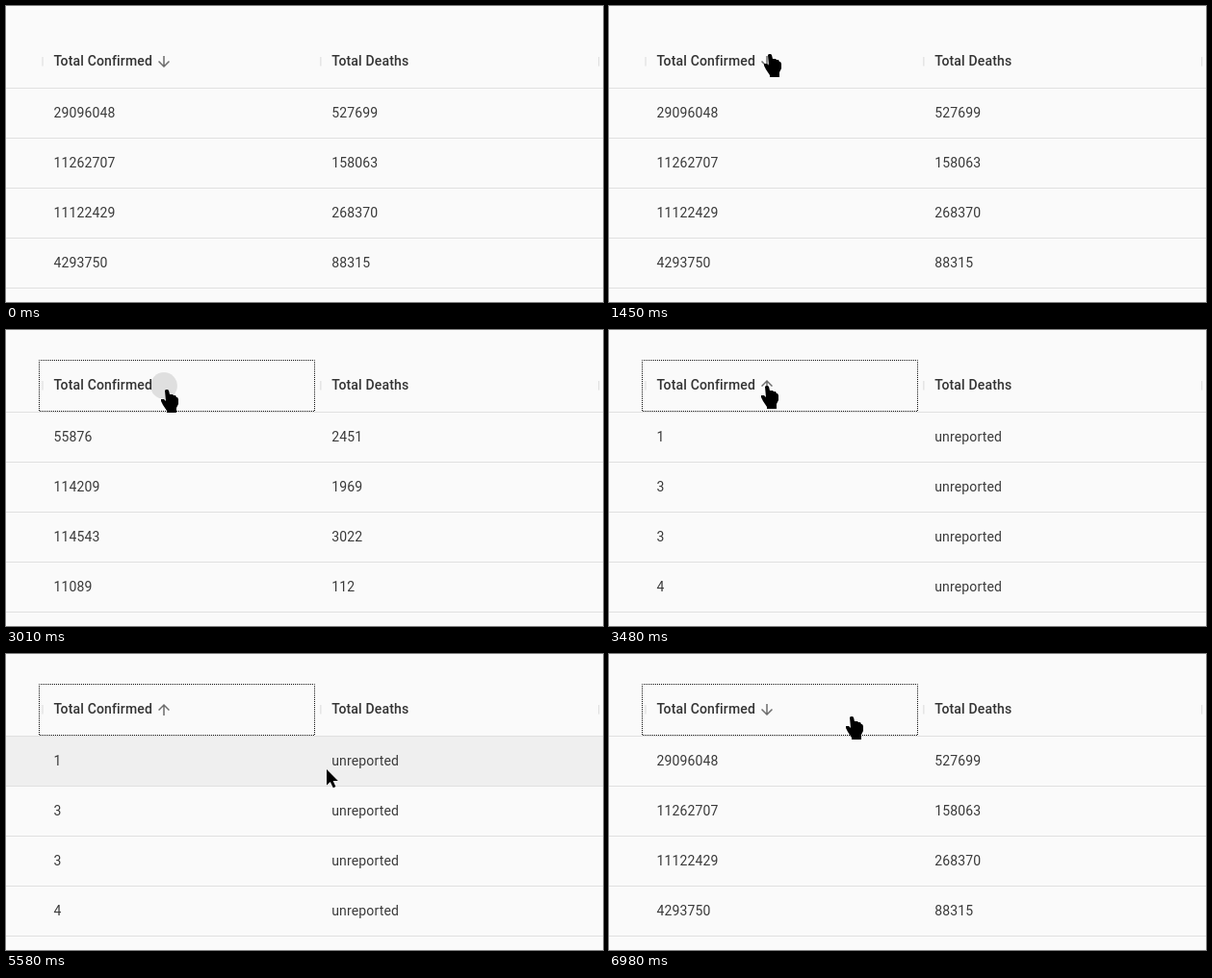
An HTML page for the animation above (8 s loop, 620x308 px).

```html
<!DOCTYPE html>
<html lang="en">
<head>
<meta charset="utf-8">
<title>Sortable table</title>
<style>
  html, body { margin: 0; width: 100%; height: 100%; overflow: hidden; background: #fafafa; }
  svg { display: block; }
  text { font: 400 14px Roboto, sans-serif; letter-spacing: .15px; fill: #3a3a3a; }
  .head { font-weight: 500; fill: #333; }
</style>
</head>
<body>
<svg width="620" height="308" viewBox="0 0 620 308">
  <rect width="620" height="308" fill="#fafafa"/>
  <rect id="hover" width="620" height="51" fill="#efefef"/>
  <g id="grid"></g>
  <path id="sortIcon" fill="#6c6c6c" d="M8 0L6.59 1.41L12.17 7H0V9H12.17L6.59 14.59L8 16L16 8Z"/>
  <rect id="focus" x="34.5" y="31.5" width="286" height="53" fill="none" stroke="#111"
        stroke-dasharray="1" stroke-dashoffset=".5"/>
  <circle id="ripple" cx="164" cy="58"/>
  <path id="pointer" d="M0 0V16.5L3.8 13L6.8 19.2L9.4 18L6.6 12H11.8Z"/>
  <path id="hand" d="M-2 1L-1 0H1L2 1L3 5H6L7 6H9L10 8H11L12 10V15L10 19V24H0V22L-4 16L-6 12V10H-3L-1 12Z"/>
</svg>
<script>
const LOOP = 8000, FRAME = 76;
const ROW_TOP = 86, ROW_HEIGHT = 52, COLUMN_X = 49.4, COLUMN_WIDTH = 288.8;
const FOCUS_TIME = 2930;
const $ = id => document.getElementById(id);

const descending = {
  angle: 90,
  rows: [[29096048, 527699], [11262707, 158063], [11122429, 268370], [4293750, 88315]]
};
const unsorted = {
  rows: [[55876, 2451], [114209, 1969], [114543, 3022], [11089, 112]]
};
const ascending = { angle: -90, rows: [1, 3, 3, 4].map(n => [n, 'unreported']) };

function viewAt(t) {
  if (t >= 2000 && t < 3480) return unsorted;
  return t >= 3480 && t < 6980 ? ascending : descending;
}

// Each move continues from the previous end; "via" bends it into a quadratic curve.
const entry = [575, 316];
const moves = [
  { start: 450, end: 1220, via: [246, 32], to: [181, 58] },
  { start: 1300, end: 1450, to: [167, 50] },
  { start: 2550, end: 2690, to: [169, 64] },
  { start: 2930, end: 3330, to: [164, 58] },
  { start: 4480, end: 4880, to: [146, 142] },
  { start: 4960, end: 5280, via: [42, 125], to: [152, 118] },
  { start: 5350, end: 5740, via: [300, 134], to: [412, 107] },
  { start: 5970, end: 6040, to: [399, 109] },
  { start: 6210, end: 6810, via: [275, 125], to: [252, 65] }
];
const presses = [{ start: 1770, end: 2000 }, { start: FOCUS_TIME, end: 3330 }];

// Progress from 0 to 1 in frame-sized steps; the first step is taken at the start.
function progress({ start, end }, t) {
  const count = Math.round((end - start) / FRAME);
  const step = Math.floor((t - start) / (end - start) * count + .15);
  return Math.min(1, (step + 1) / (count + 1));
}

function cursorAt(t) {
  const index = moves.findLastIndex(move => move.start <= t);
  if (index < 0) return null;
  const move = moves[index], from = index ? moves[index - 1].to : entry;
  const u = progress(move, t);
  return move.to.map((to, i) => {
    const via = move.via ? move.via[i] : (from[i] + to) / 2;
    return Math.round((1 - u) ** 2 * from[i] + 2 * u * (1 - u) * via + u * u * to);
  });
}

function set(node, attributes) {
  for (const key in attributes) node.setAttribute(key, attributes[key]);
}

function add(tag, attributes, content = '') {
  const node = document.createElementNS('http://www.w3.org/2000/svg', tag);
  set(node, attributes);
  node.textContent = content;
  return $('grid').appendChild(node);
}

const show = (id, visible) => set($(id), { visibility: visible ? 'visible' : 'hidden' });
const columnX = column => COLUMN_X + column * COLUMN_WIDTH;

['Total Confirmed', 'Total Deaths'].forEach((label, c) =>
  add('text', { x: columnX(c), y: 62, class: 'head' }, label));
for (let c = 0; c < 3; c++)
  add('rect', { x: columnX(c) - 12, y: 53, width: 1.3, height: 9.5, fill: '#e2e2e2' });
for (let r = 0; r < 5; r++)
  add('rect', { y: ROW_TOP - 1 + r * ROW_HEIGHT, width: 620, height: 1, fill: '#e0e0e0' });
const cells = descending.rows.map((row, r) =>
  row.map((_, c) => add('text', { x: columnX(c), y: 116 + r * ROW_HEIGHT })));

function drawTable({ angle, rows }) {
  rows.forEach((row, r) => row.forEach((value, c) => cells[r][c].textContent = value));
  show('sortIcon', angle);
  if (angle) set($('sortIcon'), { transform: `translate(164 58) rotate(${angle}) scale(.75) translate(-8 -8)` });
}

function drawRipple(t) {
  const press = presses.find(({ start, end }) => t >= start && t < end);
  show('ripple', press);
  if (!press) return;
  const u = progress(press, t);
  set($('ripple'), { r: 19 * Math.min(1, .4 + u), 'fill-opacity': .16 * (1 - u) });
}

function drawCursor(t) {
  const tip = cursorAt(t);
  const onRow = tip && tip[1] >= ROW_TOP;
  show('hover', onRow);
  show('pointer', onRow);
  show('hand', tip && !onRow);
  if (!tip) return;
  set($(onRow ? 'pointer' : 'hand'), { transform: `translate(${tip})` });
  const row = Math.floor((tip[1] - ROW_TOP) / ROW_HEIGHT);
  set($('hover'), { y: ROW_TOP + row * ROW_HEIGHT });
}

const began = performance.now();
function tick() {
  const t = (performance.now() - began) % LOOP;
  drawTable(viewAt(t));
  show('focus', t >= FOCUS_TIME);
  drawRipple(t);
  drawCursor(t);
  requestAnimationFrame(tick);
}
tick();
</script>
</body>
</html>
```
